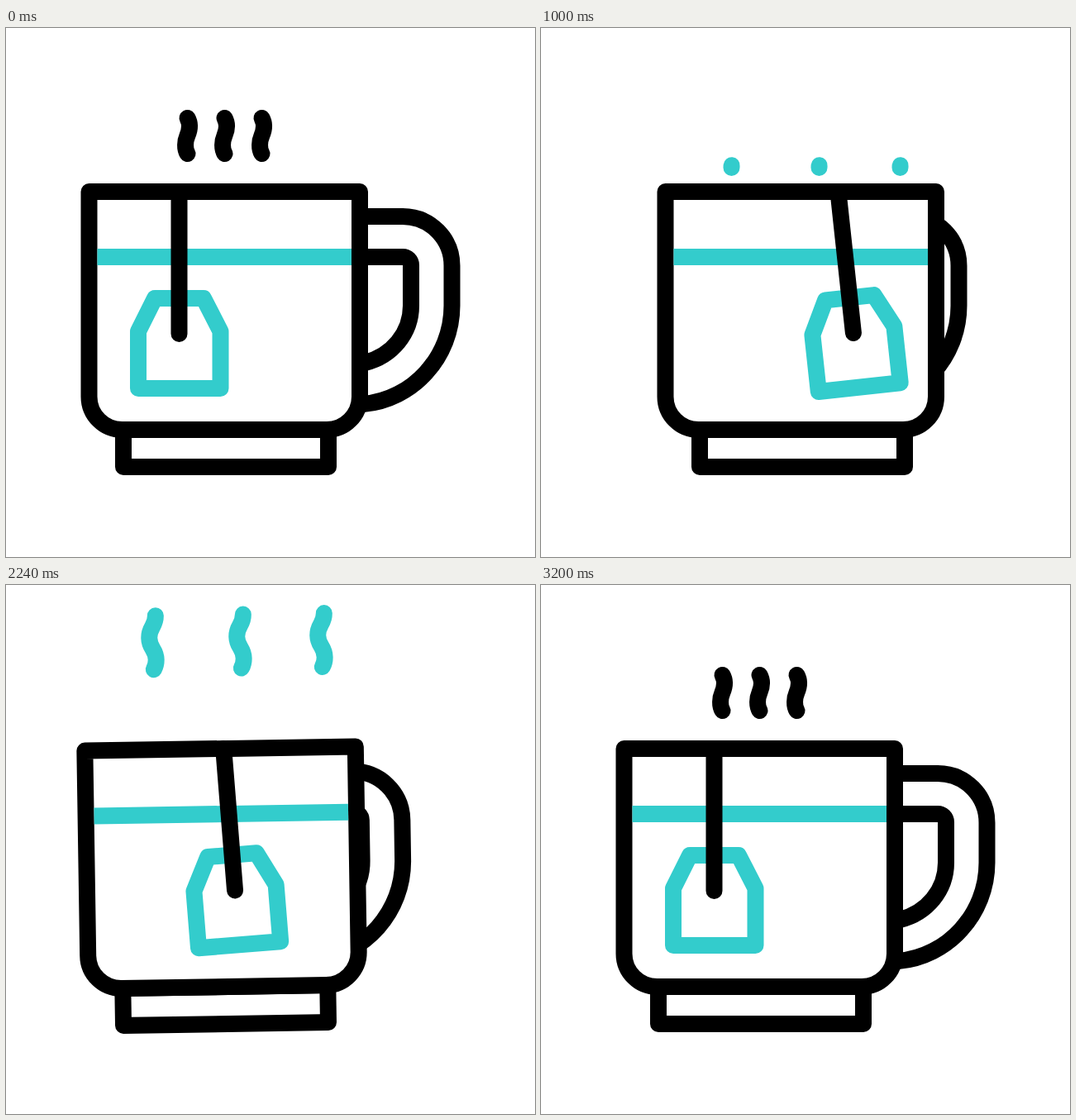
An HTML page that plays this animation: 640x640 px, repeating every 3600 ms.

```html
<!DOCTYPE html>
<html lang="en">
<head>
<meta charset="utf-8">
<title>Tea cup</title>
<style>
  html, body { margin: 0; width: 100%; height: 100%; overflow: hidden; background: #fff; }
  svg { display: block; width: 100vw; height: 100vh; }
  path { fill: none; stroke: #000; stroke-width: 20; stroke-linejoin: round; }
  .round { stroke-linecap: round; }
  .teal { stroke: #3cc; }
  .solid { fill: #fff; }
</style>
</head>
<body>
<svg viewBox="0 0 640 640">
  <g id="cup">
    <g id="handle">
      <path d="M430 228H480a59.5 59.5 0 0 1 59.5 59.5V336C539.5 398 492 450 432 455"/>
      <path d="M430 277H480a10 10 0 0 1 10 10V336c0 33-23 61-56 69"/>
    </g>
    <path d="M142 486H390V531H142Z"/>
    <path class="solid" d="M100.5 198H428V446a40 40 0 0 1-40 40H140.5a40 40 0 0 1-40-40Z"/>
    <path class="teal" d="M110.5 277H418"/>
    <g id="steam"></g>
    <g id="bag">
      <path class="teal" d="M180 327H239L259.5 367V436H160V367Z"/>
      <path class="round" d="M209.5 198V370"/>
    </g>
  </g>
  <g id="swoosh"></g>
</svg>
<script>
const LOOP = 3600, BEAT = 320, BACK = 1780;
const $ = id => document.getElementById(id);

function addPath(parent, d, cls, x = 0) {
  const p = document.createElementNS('http://www.w3.org/2000/svg', 'path');
  p.setAttribute('d', d);
  p.setAttribute('class', 'round ' + cls);
  p.setAttribute('pathLength', 1);
  p.setAttribute('transform', `translate(${x})`);
  parent.append(p);
  return p;
}

const curl = 'M0 109C4.5 117 2.5 124 0 130C-3 137-3.5 146 0 152';
const right = 'c0-13.3 8-13.3 8-26.6', left = 'c0-13.3-8-13.3-8-26.6';
const wave = 'M-4 169' + right + left + right + left + right;
const curls = [0, 1, 2].map(i => addPath($('steam'), curl, '', 219.5 + 45 * i));
const waves = [184.5, 290.5, 388.5].map(x => addPath($('steam'), wave, 'teal', x));
const streaks = ['M44 320C110 366 200 388 289 388', 'M70 388C138 427 224 446 317 440']
  .map(d => addPath($('swoosh'), d, 'teal'));

// Eased step from 0 to 1
function ramp(t, from, to) {
  const u = Math.min(1, Math.max(0, (t - from) / (to - from)));
  return u * u * (3 - 2 * u);
}

// Pendulum that starts, peaks to the right at a given time and dies out
function swing(t, start, peak, size) {
  const x = (t - start) / 1400;
  if (x < 0 || x > 1) return 0;
  return -size * Math.cos(Math.PI * (t - peak) / BEAT) * ramp(t, start, peak) * (1 - x ** 4);
}

// Show only the part of each path between two fractions
function trim(paths, from, to) {
  for (const p of paths) {
    p.style.visibility = to - from > 0.002 ? 'visible' : 'hidden';
    p.style.strokeDasharray = `${to - from} 2`;
    p.style.strokeDashoffset = -from;
  }
}

const move = (id, value) => $(id).setAttribute('transform', value);

function draw(t) {
  // Both moves have three beats: push, recoil, settle
  const push = ramp(t, 0, 240), recoil = ramp(t, 240, 560), settle = ramp(t, 560, 900);
  const [pull, turn, rest] = [0, 1, 2].map(i => ramp(t, BACK + i * BEAT, BACK + (i + 1) * BEAT));
  const bounce = recoil - settle;

  const shift = 50 * (push - pull);
  const tilt = 5 * (push - 2 * recoil + settle - pull + 2 * turn - rest);
  const handle = -84 * (push - 0.53 * bounce - 0.8 * turn - 0.2 * rest);
  const bag = 100 * (push - 0.73 * bounce - turn);
  const angle = swing(t, 0, 250, 18) + swing(t, BACK, BACK + 315, 27.5);

  move('cup', `translate(${shift}) rotate(${tilt} 266 531)`);
  move('handle', `translate(${handle})`);
  move('bag', `translate(${bag}) rotate(${angle} 209.5 198)`);

  if (t < 1200) trim(curls, 0, 1 - ramp(t, 0, 560));
  else trim(curls, 1 - ramp(t, 2484, 3044), 1);
  trim(waves, ramp(t, 1803, 2663), ramp(t, 930, 1790));
  trim(streaks, ramp(t, 280, 540), ramp(t, 20, 270));
}

const start = performance.now();
function tick() {
  draw((performance.now() - start) % LOOP);
  requestAnimationFrame(tick);
}
tick();
</script>
</body>
</html>
```
